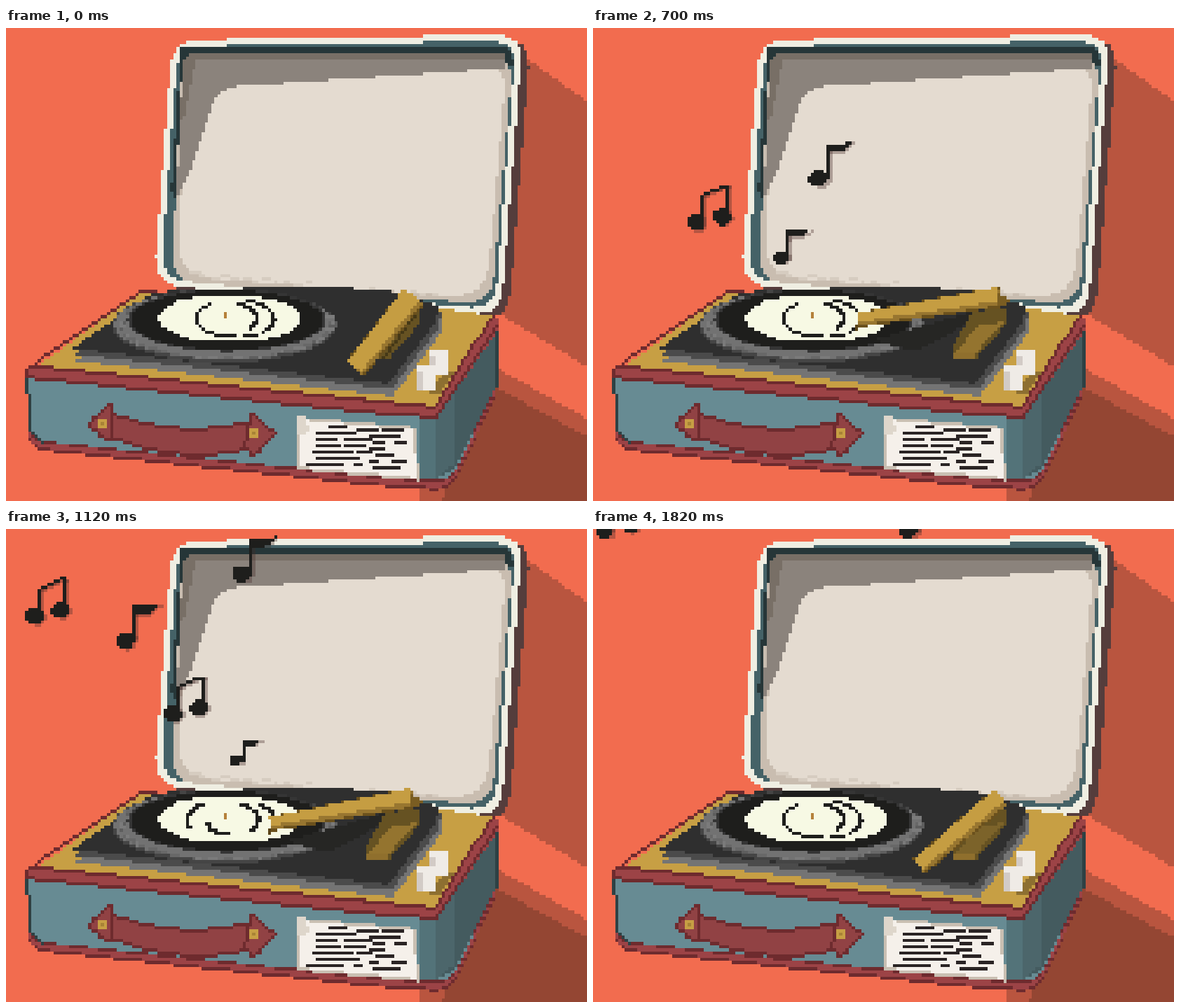
Write an HTML page with a canvas that moves like this. It is 829x676 px and loops after 1960 ms.

```html
<!DOCTYPE html>
<html lang="en">
<head>
<meta charset="utf-8">
<title>Record player</title>
<style>
html, body { margin: 0; width: 100%; height: 100%; overflow: hidden; background: #f26c4f; }
canvas { display: block; width: 100vw; height: 100vh; image-rendering: pixelated; }
</style>
</head>
<body>
<canvas id="stage" width="184" height="150"></canvas>
<script>
const COLS = 184, ROWS = 150, CELL = 829 / COLS;
const STEP = 140, STEPS = 14;
const INK = '#1e1e1c', GOLD = '#c79f44', RED = '#9c4346', MAROON = '#6e2b2e';
const view = document.getElementById('stage').getContext('2d');
const still = document.createElement('canvas');
still.width = COLS;
still.height = ROWS;
let ctx = still.getContext('2d');

let seed = 7;
const rand = () => (seed = seed * 16807 % 2147483647) / 2147483647;
const mix = (a, b, u) => a + (b - a) * u;

// Drawing helpers take stage pixels and fill whole cells.
function poly(color, pts, dx = 0, dy = 0) {
  ctx.fillStyle = color;
  const p = pts.map(([x, y]) => [(x + dx) / CELL, (y + dy) / CELL]);
  for (let row = 0; row < ROWS; row++) {
    const y = row + 0.5, hits = [];
    p.forEach(([x1, y1], i) => {
      const [x2, y2] = p[(i + 1) % p.length];
      if ((y1 <= y) !== (y2 <= y)) hits.push(x1 + (y - y1) * (x2 - x1) / (y2 - y1));
    });
    hits.sort((a, b) => a - b);
    for (let i = 0; i + 1 < hits.length; i += 2) {
      const a = Math.round(hits[i]), b = Math.round(hits[i + 1]);
      ctx.fillRect(a, row, b - a, 1);
    }
  }
}

function line(color, pts) {
  ctx.fillStyle = color;
  for (let i = 0; i + 1 < pts.length; i++) {
    const [[x1, y1], [x2, y2]] = [pts[i], pts[i + 1]].map(p => p.map(v => v / CELL));
    const n = Math.max(1, Math.ceil(Math.max(Math.abs(x2 - x1), Math.abs(y2 - y1))));
    for (let k = 0; k <= n; k++) {
      ctx.fillRect(Math.floor(mix(x1, x2, k / n)), Math.floor(mix(y1, y2, k / n)), 1, 1);
    }
  }
}

function box(color, x, y, w, h = 4) {
  const cells = v => Math.round(v / CELL);
  ctx.fillStyle = color;
  ctx.fillRect(cells(x), cells(y), Math.max(1, cells(w)), Math.max(1, cells(h)));
}

// Points along an ellipse, angles in degrees; a power above 2 squares it off.
function arc(cx, cy, rx, ry, from = 0, to = 360, power = 2) {
  const bend = v => Math.sign(v) * Math.abs(v) ** (2 / power);
  return Array.from({ length: 41 }, (_, i) => {
    const a = mix(from, to, i / 40) * Math.PI / 180;
    return [cx + rx * bend(Math.cos(a)), cy + ry * bend(Math.sin(a))];
  });
}

const oval = (color, ...args) => poly(color, arc(...args));

function edges(pts, i) {
  const [x, y] = pts[i];
  return [pts.at(i - 1), pts[(i + 1) % pts.length]].map(([a, b]) => {
    const len = Math.hypot(a - x, b - y);
    return [(a - x) / len, (b - y) / len, len];
  });
}

function rounded(pts, r) {
  return pts.flatMap(([x, y], i) => {
    const [[ax, ay, la], [bx, by, lb]] = edges(pts, i);
    const ra = Math.min(r, la / 2), rb = Math.min(r, lb / 2);
    return [0, 0.25, 0.5, 0.75, 1].map(u => {
      const a = (1 - u) ** 2 * ra, b = u * u * rb;
      return [x + ax * a + bx * b, y + ay * a + by * b];
    });
  });
}

function inset(pts, d) {
  return pts.map(([x, y], i) => {
    const [[ax, ay], [bx, by]] = edges(pts, i);
    const k = d / Math.abs(ax * by - ay * bx);
    return [x + (ax + bx) * k, y + (ay + by) * k];
  });
}

function bar(color, [ax, ay], [bx, by], wa, wb) {
  const len = Math.hypot(bx - ax, by - ay);
  const nx = (ay - by) / len / 2, ny = (bx - ax) / len / 2;
  poly(color, [[ax + nx * wa, ay + ny * wa], [bx + nx * wb, by + ny * wb],
    [bx - nx * wb, by - ny * wb], [ax - nx * wa, ay - ny * wa]]);
}

function edged(fill, edge, pts) {
  poly(fill, pts);
  line(edge, [...pts, pts[0]]);
}

function drawWall() {
  box('#f26c4f', 0, 0, 829, 676);
  poly('#b9553f', [[735, 38], [829, 104], [829, 484], [690, 400]]);
  poly('#b9553f', [[690, 480], [829, 558], [829, 676], [590, 676], [590, 640]]);
  poly('#944633', [[690, 508], [829, 584], [829, 676], [622, 676]]);
}

function drawLid() {
  const lid = [[237, 17], [738, 9], [706, 412], [211, 366]];
  const lining = [[252, 37], [724, 36], [693, 394], [236, 362]];
  poly('#553d3c', rounded(lid, 40), 11, 6);
  poly('#efeee2', rounded(lid, 40));
  poly('#456267', rounded(inset(lid, 9), 36));
  poly('#263638', [[250, 28], [716, 26], [726, 52], [262, 44], [240, 252], [236, 230]]);
  poly('#c9bdb0', rounded(lining, 40));
  poly('#e4dbd0', rounded(inset(lining, 8), 50));
  poly('#8b837c', [[254, 46], [264, 38], [712, 38], [714, 57], [525, 70], [320, 84], [300, 96], [264, 200], [243, 242]]);
  poly('#786f66', [[254, 46], [264, 37], [712, 37], [714, 47], [270, 47], [254, 130], [248, 130]]);
  for (let i = 0; i < 24; i++) box('#d6ccc0', 262 + i * 15, 346 + i * 1.3 + rand() * 7, 5 + rand() * 12);
}

function drawCase() {
  const body = rounded([[30, 505], [612, 565], [703, 440], [703, 517], [634, 662], [530, 655], [32, 602]], 24);
  poly(MAROON, body);
  poly(RED, body, 0, -4);
  poly(MAROON, body, 0, -11);
  poly('#678b93', body, 0, -14);
  poly('#537379', [[590, 540], [613, 540], [613, 646], [590, 645]]);
  poly('#445b5f', [[612, 540], [703, 415], [703, 502], [640, 630], [612, 646]]);
  poly('#4c666b', [[612, 540], [640, 505], [640, 622], [612, 646]]);
  line('#2e4144', [[30, 498], [35, 576], [50, 592]]);
  line('#2e4144', [[701, 430], [701, 512]]);

  // rim and top panel
  const top = [[190, 378], [430, 374], [694, 411], [612, 542], [44, 484]];
  poly(RED, [[30, 485], [44, 482], [610, 538], [694, 410], [703, 418], [703, 430], [614, 558], [520, 549], [30, 501]]);
  poly(GOLD, top);
  line(MAROON, [[215, 375], top[0], [32, 486], [30, 499], [520, 549], [614, 556], [701, 428]]);
  line(MAROON, [top[4], top[3], top[2]]);

  // deck
  const deck = [[98, 466], [215, 385], [430, 376], [545, 382], [621, 405], [617, 428], [550, 516]];
  poly('#747474', deck, 2, 10);
  poly('#4b4b4b', deck);
  poly('#2f2f2f', deck, -4, -8);

  // platter
  oval('#454545', 311, 425, 160, 53);
  oval('#727272', 311, 423, 157, 50);
  for (let i = 0; i < 110; i++) {
    const [x, y] = arc(309, 422, 149, 48, rand() * 360)[0];
    box(['#686868', '#7b7b7b', '#5e5e5e'][i % 3], x, y, 5 + rand() * 8);
  }
  oval('#353535', 315, 417, 142, 45);
  oval(INK, 315, 417, 137, 43);
  oval('#f7f9e4', 316, 415, 105, 33, 0, 360, 2.2);
}

function drawHandle() {
  const curve = (y, rise) => Array.from({ length: 9 }, (_, i) => {
    const u = i / 8;
    return [153 + 190 * u, y + rise * u + 58 * u * (1 - u)];
  });
  edged('#914244', MAROON, [...curve(552, 12), ...curve(586, 16).reverse()]);
  edged('#914244', MAROON, [[118, 565], [150, 537], [153, 590], [134, 584]]);
  edged('#914244', MAROON, [[351, 550], [383, 580], [354, 612], [340, 600]]);
  for (const [x, y] of [[131, 559], [347, 573]]) {
    box(GOLD, x, y, 14, 14);
    box('#a88336', x + 4.5, y + 4.5, 5, 5);
  }
}

function drawPaper() {
  const paper = [[413, 555], [586, 571], [589, 647], [416, 631]];
  poly('#c9bfb2', paper);
  poly('#f5f0ea', inset(paper, 4));
  poly('#ded6cb', [[414, 556], [428, 552], [432, 577], [416, 582]]);
  for (let row = 0; row < 7; row++) {
    for (let x = row ? 424 + rand() * 20 : 460; x < 555; x += 24 + rand() * 22) {
      box('#2a2424', x, 568 + row * 9 + (x - 460) * 0.05, Math.min(10 + rand() * 32, 572 - x));
    }
  }
}

function drawKnobs() {
  poly('#8d6f31', [[600, 520], [632, 490], [640, 492], [618, 524]]);
  for (const [x, y] of [[604, 460], [586, 483]]) {
    poly('#efebe6', rounded([[x, y], [x + 28, y], [x + 28, y + 35], [x, y + 38]], 6));
    box('#d2cbc6', x, y + 8, 9, 26);
  }
}

// Broken rings on the record: radius, start and end angle.
const RINGS = [
  [[100, 130, 222], [43, 75, 235], [43, -65, 35], [69, -65, 38], [69, 52, 66]],
  [[100, 130, 222], [56, 155, 235], [28, 80, 160], [47, -65, 45], [69, -45, 0]]
];

function drawRings(turned) {
  for (const [r, from, to] of RINGS[turned]) {
    line(INK, arc(314, 415, r, 15 + r * 0.2, from, to));
  }
  box('#b5813a', 311, 405, 4, 9);
}

// Arm tip for each pose: x, y, width.
const TIPS = {
  rest: [498, 487, 28], lift: [465, 482, 22], swing: [440, 450, 18],
  lower: [387, 432, 17], play: [378, 421, 16], bob: [378, 417, 16]
};
const INTRO = ['rest', 'lift', 'swing', 'lower'];

function poseAt(step) {
  const fromRest = Math.min(step, STEPS - step);
  return INTRO[fromRest] || (step % 2 ? 'bob' : 'play');
}

function drawArm(pose) {
  const [x, y, width] = TIPS[pose];
  const tip = [x, y], pivot = [581, 384];
  const playing = x < 400, resting = pose === 'rest';
  if (playing) poly('#262624', [[400, 446], [545, 404], [530, 425], [460, 462]]);

  // cradle
  const cradle = [[540, 405], [592, 400], [590, 422], [547, 472], [512, 474], [512, 460]];
  poly('#665222', cradle);
  if (resting) {
    line('#453817', [[588, 404], [540, 470]]);
  } else {
    poly(playing ? '#94742f' : '#7c632a', [[552, 424], [586, 420], [547, 463], [516, 463]]);
    box('#8f6f2d', 514, 464, 32, 9);
  }

  const root = mix(26, width + 4, resting ? 1 : 0.3);
  bar('#6b511d', pivot, tip, root + 5, width + 5);
  bar('#987630', pivot, tip, root, width);
  bar('#c59d42', [pivot[0] - 2, pivot[1] - 4], [x - 1, y - 3], root - 4, width - 4);
  if (playing || pose === 'swing') {
    poly('#7a5d22', [[577, 379], [594, 386], [590, 397], [575, 398]]);
    box('#5a4418', x - 2, y + 8, 5, 10);
  }
}

// Key points: step, head left, head bottom, size.
const NOTES = [
  { keys: [[4, 284, 297, 1], [6, 334, 157, 1], [8, 324, 76, 1], [9, 321, 36, 1]] },
  { pair: true, keys: [[4, 167, 355, 1], [5, 135, 290, 1], [6, 63, 215, 1], [7, 58, 176, 1], [9, -2, 96, 1]] },
  { keys: [[4, 290, 375, 0.7], [6, 226, 300, 1], [8, 158, 172, 1], [10, 90, 44, 1]] },
  { pair: true, keys: [[6, 289, 355, 0.7], [8, 226, 276, 1], [11, 4, 40, 1], [13, 4, 13, 1]] },
  { keys: [[8, 320, 338, 0.72], [11, 374, 62, 1], [13, 438, 13, 1]] }
];

function noteShape(color, x, y, size, pair) {
  const tall = size ** 1.7;
  const at = pts => pts.map(([a, b]) => [x + a * size, y + b * tall]);
  const head = (cx, cy) => oval(color, x + cx * size, y + cy * tall, 13 * size, 12 * tall);
  head(12, -12);
  if (pair) {
    head(49, -20);
    line(color, at([[21, -12], [21, -50], [37, -58], [50, -64], [57, -64], [57, -20]]));
  } else {
    line(color, at([[25, -12], [25, -60]]));
    poly(color, at([[23, -62], [50, -62], [65, -67], [46, -50], [23, -50]]));
  }
}

function drawNotes(step) {
  for (const { pair, keys } of NOTES) {
    const next = keys.findIndex(k => k[0] >= step);
    if (next < 0 || step < keys[0][0]) continue;
    const b = keys[next], a = keys[Math.max(0, next - 1)];
    const u = a === b ? 0 : (step - a[0]) / (b[0] - a[0]);
    const [x, y, size] = [1, 2, 3].map(i => mix(a[i], b[i], u));
    noteShape('rgba(70, 45, 40, 0.35)', x + 4, y + 2, size, pair);
    noteShape(INK, x, y, size, pair);
  }
}

[drawWall, drawLid, drawCase, drawHandle, drawPaper, drawKnobs].forEach(draw => draw());
ctx = view;

function render(step) {
  ctx.drawImage(still, 0, 0);
  drawRings(step > 4 && poseAt(step) === 'play' ? 1 : 0);
  drawArm(poseAt(step));
  drawNotes(step);
}

const start = performance.now();
let shown = -1;
function tick() {
  const step = Math.floor((performance.now() - start) / STEP) % STEPS;
  if (step !== shown) render(shown = step);
  requestAnimationFrame(tick);
}
tick();
</script>
</body>
</html>
```
